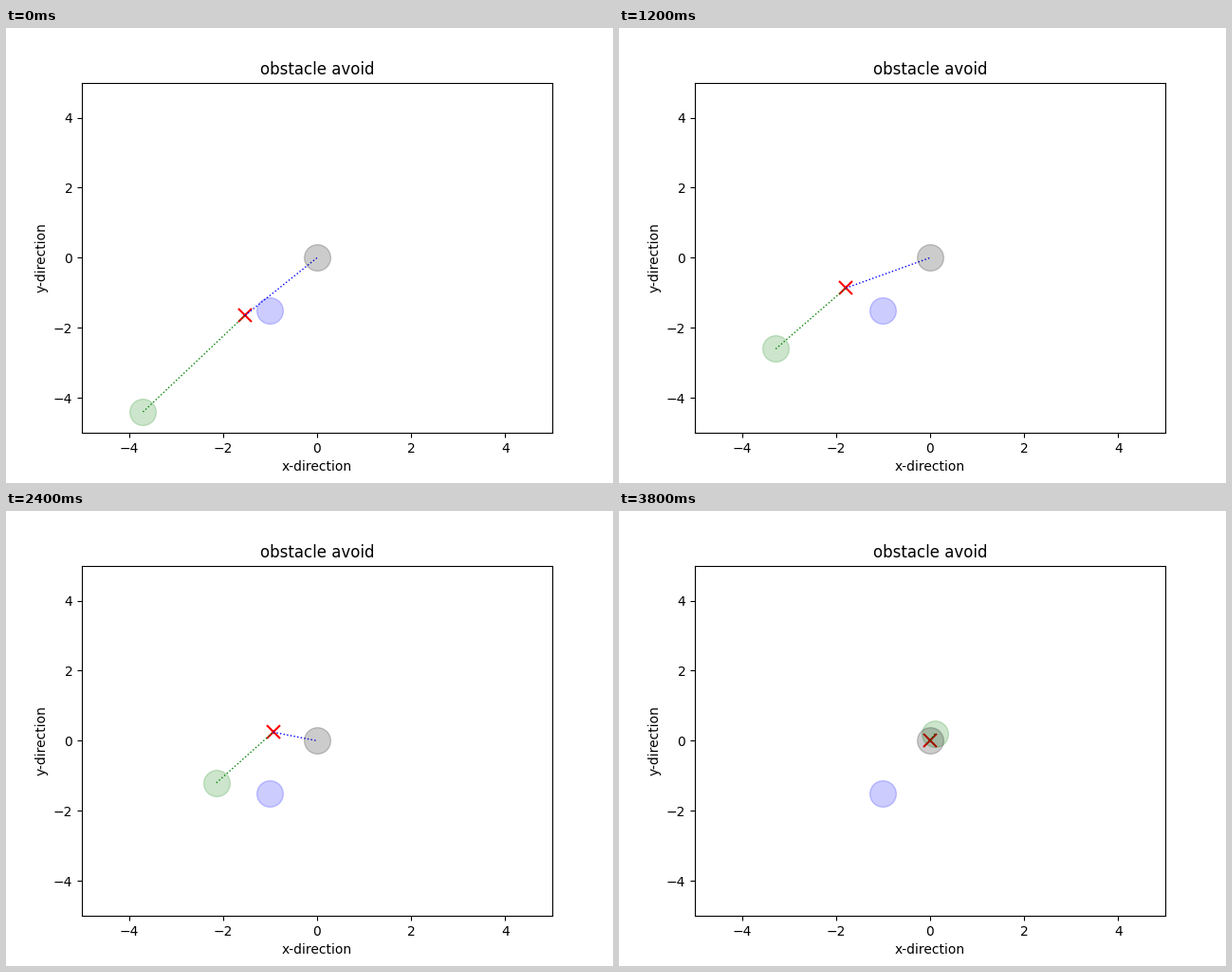
Write a matplotlib script that moves like this. It is 640 by 480 pixels and loops after 4 s.

```python
import numpy as np
import matplotlib.pyplot as plt
from matplotlib.animation import FuncAnimation

FRAMES = 20
INTERVAL = 200
GOAL = np.array([0.0, 0.0])
OBSTACLE = np.array([-1.0, -1.5])


def robot_at(k):
    """Steady acceleration along x, slower climb after the eighth step."""
    x = -3.7 + 0.01 * k * (k + 1)
    y = -4.4 + 0.3 * min(k, 8) + 0.2 * max(k - 8, 0)
    return np.array([x, y])


def waypoint(robot):
    """Pull the goal back along the obstacle direction while it is ahead."""
    to_obstacle = OBSTACLE - robot
    reach = np.sqrt(max(0.0, 2.64 * (-robot[0] - 1.788)))
    return GOAL - reach * to_obstacle / np.hypot(*to_obstacle)


plt.rcParams["font.family"] = "DejaVu Sans"
fig, ax = plt.subplots(figsize=(6.4, 4.8), dpi=100)
ax.set(xlim=(-5, 5), ylim=(-5, 5), title="obstacle avoid",
       xlabel="x-direction", ylabel="y-direction")


def disc(pos, color):
    return ax.plot([pos[0]], [pos[1]], "o", color=color, ms=20, alpha=0.2)[0]


target, = ax.plot([], [], "x", color="red", ms=10, mew=1.5)
approach, = ax.plot([], [], ":", color="green", lw=1)
final, = ax.plot([], [], ":", color="blue", lw=1)
robot_disc = disc(robot_at(0), "green")
disc(OBSTACLE, "blue")
disc(GOAL, "black")


def join(line, a, b):
    line.set_data([a[0], b[0]], [a[1], b[1]])


def update(k):
    robot = robot_at(k)
    via = waypoint(robot)
    robot_disc.set_data([robot[0]], [robot[1]])
    target.set_data([via[0]], [via[1]])
    join(approach, robot, via)
    join(final, via, GOAL)
    final.set_visible(not np.allclose(via, GOAL))
    return target, approach, final, robot_disc


anim = FuncAnimation(fig, update, frames=FRAMES, interval=INTERVAL,
                     repeat=True, repeat_delay=0)
plt.show()
```
